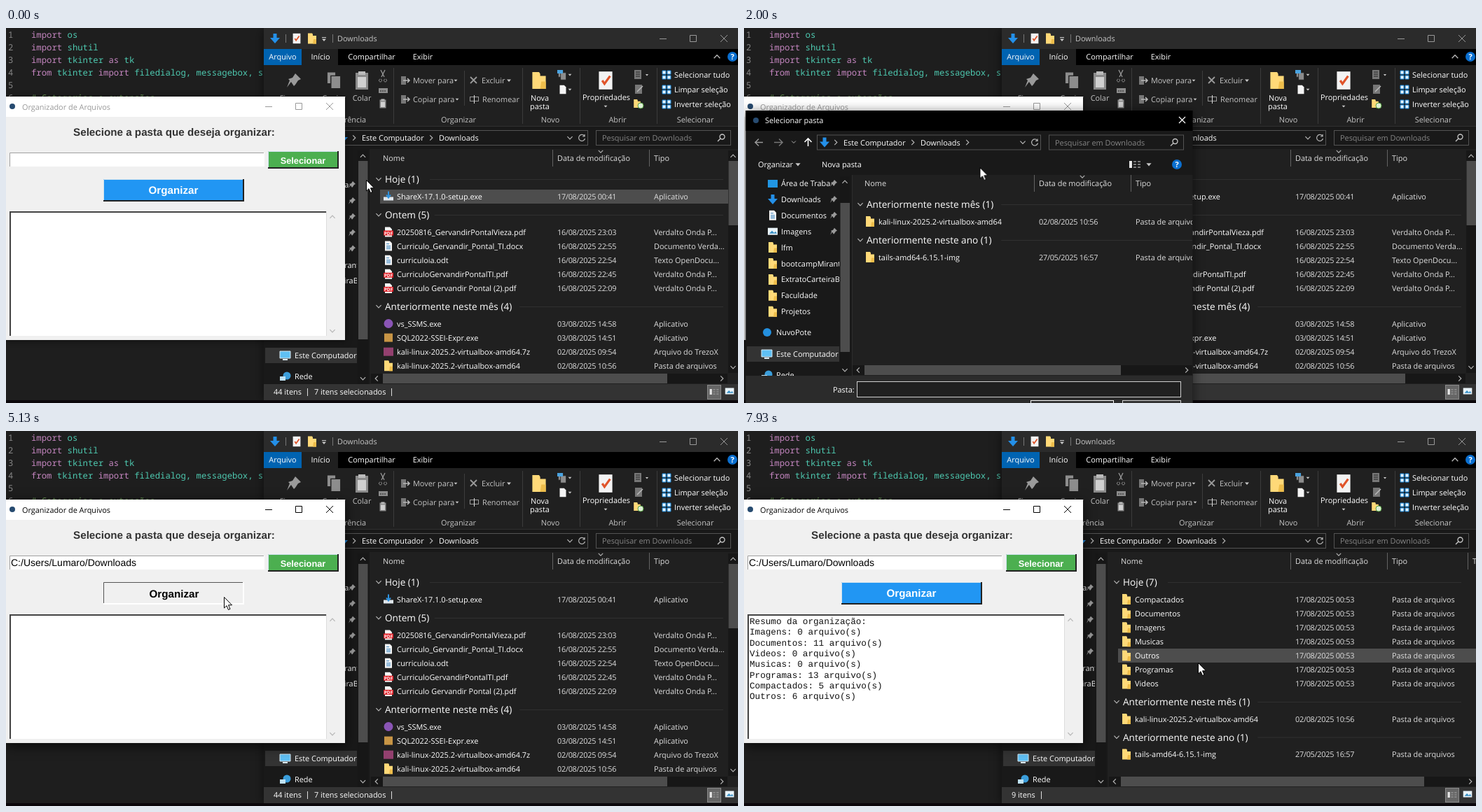
These frames come from a looping animation (1045 by 536 pixels, 8 s). An HTML page:

```html
<!DOCTYPE html>
<html lang="pt-BR">
<head>
<meta charset="utf-8">
<title>Organizador de Arquivos</title>
<style>
html, body { margin: 0; width: 100%; height: 100%; overflow: hidden; background: #1e1e1e; }
svg { display: block; }
text { font: 10.9px "Open Sans", "Noto Sans", sans-serif; fill: #fff; text-rendering: geometricPrecision; }
.mid { text-anchor: middle; }
.soft { fill: #c4c4c4; }
.cell { fill: #dedede; }
.date { fill: #dedede; letter-spacing: -.27px; }
.group { font-size: 13.6px; }
.code { font: 12.28px "Noto Sans Mono", "DejaVu Sans Mono", monospace; fill: #4ec9b0; white-space: pre; }
.kw { fill: #c586c0; }
.note { fill: #6a9955; }
.dim { fill: #858585; }
.msg { fill: #000; font-size: 10.5px; }
.bold { font: bold 15.2px "Liberation Sans", Arial, sans-serif; fill: #333; text-anchor: middle; }
.black { fill: #000; }
.btn { fill: #fff; }
.small { font-size: 12.8px; }
.path { font: 14px "Liberation Sans", Arial, sans-serif; fill: #000; }
.mono { font: 12.65px "Liberation Mono", "Courier New", monospace; fill: #111; white-space: pre; }

.shade { filter: drop-shadow(0 2px 8px rgba(0,0,0,.55)); }
.focus { animation: focus 8s step-end infinite; }
.focus text { fill: currentColor; }
.focus path { stroke: currentColor; }
.open { animation: glow 8s step-end infinite; }
.pick { animation: pick 8s step-end infinite; }
.press { animation: press 8s step-end infinite; }
.loading { animation: until-nav 8s step-end infinite; }
.navReady { animation: from-nav 8s step-end infinite; }
.working { animation: until-list 8s step-end infinite; }
.listReady { animation: from-list 8s step-end infinite; }
.typed { animation: from-path 8s step-end infinite; }
.summary { animation: from-summary 8s step-end infinite; }
.crumb { animation: from-crumb 8s step-end infinite; }
.before { animation: until-sorted 8s step-end infinite; }
.after { animation: from-sorted 8s step-end infinite; }
.count0 { animation: until-count 8s step-end infinite; }
.count1 { animation: from-count 8s step-end infinite; }
.okHover { animation: from-ok 8s step-end infinite; }
.hoverOut { animation: hover-out 8s linear infinite; }
.hoverIn { animation: hover-in 8s linear infinite; }
#dialog { transform-origin: 322px 342px; animation: dialog 8s linear infinite; }
#message { transform-origin: 422px 286px; animation: message 8s linear infinite; }
#cursor { animation: cursor 8s ease-in-out infinite; }

@keyframes focus {
  0%, 17.5%, 66.6% { color: #999; }
  7.5%, 41.6%, 86.6% { color: #000; }
}
@keyframes glow {
  0%, 17.5%, 66.6% { filter: drop-shadow(0 1px 5px rgba(0,0,0,.5)); }
  7.5%, 41.6%, 86.6% { filter: drop-shadow(0 4px 9px rgba(0,0,0,.65)); }
}
@keyframes pick { 0%, 9.2% { opacity: 0; } 7.5% { opacity: 1; } }
@keyframes press { 0%, 66.6% { opacity: 0; } 64.1% { opacity: 1; } }
@keyframes until-nav { 0% { opacity: 1; } 20.8% { opacity: 0; } }
@keyframes from-nav { 0% { opacity: 0; } 20.8% { opacity: 1; } }
@keyframes until-list { 0% { opacity: 1; } 24.1% { opacity: 0; } }
@keyframes from-list { 0% { opacity: 0; } 24.1% { opacity: 1; } }
@keyframes from-path { 0% { opacity: 0; } 50.85% { opacity: 1; } }
@keyframes from-summary { 0% { opacity: 0; } 66.6% { opacity: 1; } }
@keyframes from-crumb { 0% { opacity: 0; } 74.1% { opacity: 1; } }
@keyframes until-sorted { 0% { opacity: 1; } 87.5% { opacity: 0; } }
@keyframes from-sorted { 0% { opacity: 0; } 87.5% { opacity: 1; } }
@keyframes until-count { 0% { opacity: 1; } 93.3% { opacity: 0; } }
@keyframes from-count { 0% { opacity: 0; } 93.3% { opacity: 1; } }
@keyframes from-ok { 0% { opacity: 0; } 81.5% { opacity: 1; } }
@keyframes hover-out { 0%, .85% { opacity: 1; } 3.4%, 100% { opacity: 0; } }
@keyframes hover-in { 0%, 94.8% { opacity: 0; } 96.5%, 100% { opacity: 1; } }
@keyframes dialog {
  0%, 17.4% { opacity: 0; transform: scale(.92); }
  19.13% { opacity: .74; transform: scale(.985); }
  20.9%, 41.2% { opacity: 1; transform: none; }
  44% { opacity: .5; transform: scale(.965); }
  46.6% { opacity: .1; transform: scale(.93); }
  48.4% { opacity: .008; transform: scale(.92); }
  49.1%, 100% { opacity: 0; transform: scale(.92); }
}
@keyframes message {
  0%, 66.6% { opacity: 0; transform: scale(.9); }
  70%, 85.6% { opacity: 1; transform: none; }
  88.8%, 100% { opacity: 0; transform: scale(.9); }
}
@keyframes cursor {
  0%, .85% { transform: translate(514px, 217px); }
  3.4%, 13.3% { transform: translate(459px, 182px); }
  18.7%, 24.1% { transform: translate(334px, 194px); }
  34.1% { transform: translate(480px, 505px); }
  35.9%, 50.3% { transform: translate(489px, 540px); }
  60.9%, 73.3% { transform: translate(311px, 237px); }
  83.4%, 92.4% { transform: translate(489px, 333px); }
  98.5%, 100% { transform: translate(648px, 331px); }
}
</style>
</head>
<body>
<svg id="stage" width="1045" height="536" viewBox="0 0 1045 536">
<defs>
  <clipPath id="navClip"><path d="M3 210H136V497H3Z"/></clipPath>
  <clipPath id="sideClip"><path d="M368 173H501V508H368Z"/></clipPath>
  <clipPath id="paneClip"><path d="M154 205H640V480H154Z"/></clipPath>
  <path id="chev" d="M-1.8-3.6L1.8 0L-1.8 3.6" fill="none" stroke="#b5b5b5" stroke-width="1.2"/>
  <path id="drop" d="M-3-1.5H3L0 2Z" fill="#c8c8c8"/>
  <g id="folder"><path d="M-6-7.500H0L1-6V-4H6V7.500H-6Z" fill="#ffd978"/><path d="M2 1H6V7.500H1Z" fill="#eebd4b"/></g>
  <path id="page" d="M-5-7H2L5-4V7H-5Z" fill="#f4f4f4"/>
  <g id="pdf"><use href="#page"/><path d="M-7-2H7V5H-7Z" fill="#e01f26"/><text y="4" class="mid" style="font-size:6.5px;font-weight:bold">PDF</text></g>
  <g id="doc"><use href="#page"/><path d="M-3-3H1M-3 0H3M-3 2H3M-3 4H3" stroke="#3c86c2" fill="none"/></g>
  <g id="setup"><path d="M-7 1H7V6H-7Z" fill="#dfe6ec"/><path d="M0-7V1M-3-2L0 2L3-2" stroke="#2f93e0" stroke-width="2" fill="none"/></g>
  <circle id="violet" r="6.5" fill="#8a55b5"/>
  <path id="tan" d="M-6-6H6V6H-6Z" fill="#c89545"/>
  <path id="wine" d="M-7-6H7V6H-7Z" fill="#93406f"/>
  <circle id="leaf" r="4" fill="#274b70"/>
  <circle id="cloud" r="6" fill="#2490df"/>
  <path id="down" d="M-2.5-7H2.5V-1H7L0 7L-7-1H-2.5Z" fill="#2490e8"/>
  <path id="star" d="M0-6L2-2H6L3 1L4 6L0 3L-4 6L-3 1L-6-2H-2Z" fill="#2e9df0"/>
  <g id="pc"><path d="M-8-6H7V4H-8Z" fill="#5fc0f4" stroke="#d9e9f2"/><path d="M-4 6H3" stroke="#d9e9f2" stroke-width="2"/></g>
  <g id="net"><circle cx="2" cy="-1" r="5.5" fill="#3b9edb"/><path d="M-8 0H0V6H-8Z" fill="#bfe2f5"/></g>
  <path id="desk" d="M-7-5H7V6H-7Z" fill="#2196e3"/>
  <g id="image"><path d="M-7-5H7V5H-7Z" fill="#eaf4fa"/><path d="M-5 3L-1-1L2 2L4 0L6 3Z" fill="#388fc4"/></g>
  <path id="pin" d="M1-5L5-1L3 0L1 3L0 4L-2 1L-5 5L-3 0L-4-1L-1-2Z" fill="#9a9a9a"/>
  <g id="lens" fill="none" stroke="#c8c8c8" stroke-width="1.3"><circle cx="1.5" cy="-1.5" r="3.5"/><path d="M-1 1L-5 5"/></g>
  <path id="reload" d="M3.5-3A4.5 4.5 0 1 0 4.5 1M4-5V-2H1" fill="none" stroke="#b5b5b5" stroke-width="1.2"/>
  <g id="help"><circle r="7" fill="#0a6fd0"/><text y="4" class="mid" style="font-weight:bold">?</text></g>
  <g id="check"><path d="M-6-8H6V8H-6Z" fill="#f3f3f3"/><path d="M-3 0L-1 3L4-4" stroke="#e0542a" stroke-width="2" fill="none"/></g>
  <g id="sheets" fill="#8d8d8d" stroke="#202020"><path d="M-7-8H2V4H-7Z"/><path d="M-3-4H7V9H-3Z"/></g>
  <g id="tiles" fill="#e5f2fb" stroke="#1686d9"><path d="M-6-6H-1V-1H-6ZM1-6H6V-1H1ZM-6 1H-1V6H-6ZM1 1H6V6H1Z"/></g>
  <g id="lines"><path d="M-8-5H-4V5H-8Z" fill="#e8e8e8"/><path d="M-2-4H2M4-4H8M-2 0H2M4 0H8M-2 4H2M4 4H8" stroke="#999" stroke-width="1.5"/></g>
</defs>
</svg>
<script>
const T = (x, y, s, c = '') => `<text x="${x}" y="${y + 4}" class="${c}">${s}</text>`;
const R = (x, y, w, h, fill, more = '') => `<rect x="${x}" y="${y}" width="${w}" height="${h}" fill="${fill}" ${more}/>`;
const P = (d, stroke, w = 1, more = '') => `<path d="${d}" fill="none" stroke="${stroke}" stroke-width="${w}" ${more}/>`;
const I = (id, x, y, turn = 0, size = 1) =>
  `<use href="#${id}" transform="translate(${x} ${y}) rotate(${turn}) scale(${size})"/>`;
const G = (c, ...parts) => `<g class="${c}">${parts.join('')}</g>`;
const clip = (id, ...parts) => `<g clip-path="url(#${id})">${parts.join('')}</g>`;
const each = (list, f) => list.map(f).join('');
const frame = (x, y, w, h, stroke, fill = 'none') => R(x + .5, y + .5, w - 1, h - 1, fill, `stroke="${stroke}"`);

function editor() {
  const kw = s => `<tspan class="kw">${s}</tspan>`;
  const code = [kw('import') + ' os', kw('import') + ' shutil', `${kw('import')} tkinter ${kw('as')} tk`,
    `${kw('from')} tkinter ${kw('import')} filedialog, messagebox, scrolledtext`, '',
    '<tspan class="note"># Categorias e extensões</tspan>'];
  return R(0, 0, 1045, 536, '#1e1e1e') + each(code, (s, i) =>
    T(3, 10 + 18 * i, i + 1, 'code dim') + T(36, 10 + 18 * i, s, 'code'));
}

const winButtons = (x, y) => P(`M${x - 5} ${y + .5}h10M${x + 38.5} ${y - 4.5}h9v9h-9z`
  + `M${x + 82} ${y - 5}l10 10m0-10l-10 10`, '#999');

function address(ox, y, end, crumb) {
  return frame(ox + 104 - 366, y - 11, end - ox + 262, 22, '#535353', '#191919')
    + I('down', ox - 251, y) + I('chev', ox - 235, y) + T(ox - 224, y, 'Este Computador')
    + I('chev', ox - 125, y) + T(ox - 114, y, 'Downloads') + G(crumb, I('chev', ox - 47, y))
    + I('chev', end - 26, y, 90) + I('reload', end - 9, y);
}
const search = (x, y) => frame(x, y - 11, 193, 22, '#535353', '#191919')
  + T(x + 9, y, 'Pesquisar em Downloads', 'dim') + I('lens', x + 179, y);

const header = (ox, y) => T(ox, y, 'Nome', 'cell') + T(ox + 249, y, 'Data de modificação', 'cell')
  + T(ox + 387, y, 'Tipo', 'cell') + I('chev', ox + 311, y - 9.5, 90, .9)
  + P(`M${ox + 242.5} ${y - 12}v24m138-24v24`, '#636363');

function list(ox, groups) {
  return each(groups, ([y, title, rows]) => I('chev', ox - 6, y, 90) + T(ox + 3, y + 1, title, 'group')
    + P(`M${ox + 13 + title.length * 6.75} ${y + .5}H${ox + 486}`, '#303030')
    + each(rows, ([icon, name, date, type], i) => {
      const ry = y + 24.5 + 20.1 * i;
      return I(icon, ox + 8, ry) + T(ox + 20, ry, name) + T(ox + 249, ry, date, 'date') + T(ox + 387, ry, type, 'cell');
    }));
}
const dir = (name, date) => ['folder', name, date, 'Pasta de arquivos'];
const kali = dir('kali-linux-2025.2-virtualbox-amd64', '02/08/2025 10:56');
const tails = dir('tails-amd64-6.15.1-img', '27/05/2025 16:57');

function sidebar(ox, dy) {
  const items = [['desk', 'Área de Traba'], ['down', 'Downloads'], ['doc', 'Documentos'], ['image', 'Imagens'],
    ['folder', 'lfm'], ['folder', 'bootcampMirantes'], ['folder', 'ExtratoCarteiraBase'], ['folder', 'Faculdade'], ['folder', 'Projetos']];
  const pinned = ox ? 5 : 4;
  return each(items, ([icon, name], i) => {
    const y = 222 + dy + 22.9 * i;
    return I(icon, ox + 41, y) + T(ox + 53, y, name) + (i < pinned ? I('pin', ox + 128, y) : '');
  }) + roots(ox, [['cloud', 'NuvoPote', 435], ['pc', 'Este Computador', 466], ['net', 'Rede', 496]], dy);
}
const roots = (ox, items, dy = 0) => each(items, ([icon, name, y]) =>
  (icon === 'pc' ? R(ox + 4, y + dy - 11, 148, 22, '#333') : '') + I(icon, ox + 33, y + dy) + T(ox + 46, y + dy, name));

const vBar = (x, y1, y2, a, b) => R(x - 7, y1 - 8, 14, y2 - y1 + 16, '#171717') + R(x - 6.5, a, 13.5, b - a, '#4d4d4d')
  + I('chev', x, y1, -90) + I('chev', x, y2, 90);
const hBar = (y, x1, x2, a, b) => R(x1 - 8, y - 7, x2 - x1 + 16, 14, '#171717') + R(a, y - 7, b - a, 14, '#4d4d4d')
  + I('chev', x1, y, 180) + I('chev', x2, y);

function ribbon() {
  const label = (x, s) => T(x, 131, s, 'mid soft');
  const clipboard = (x, y, s) => `<g transform="translate(${x} ${y}) scale(${s})">${R(-9, -11, 18, 24, '#8b8b8b')}${R(-5, -13, 10, 5, '#bbb')}${R(-6, -5, 12, 15, '#d0d0d0')}</g>`;
  return R(368, 53, 677, 87, '#202020') + P('M368 140.5H1045', '#303030')
    + P('M553.5 57v80M654.5 61v50M737.5 57v80M819.5 57v80M929.5 57v80', '#3c3c3c')
    + I('pin', 411, 75, 0, 2) + T(411, 100, 'Fixar no', 'mid soft')
    + I('sheets', 468, 74, 0, 1.4) + T(468, 100, 'Copiar', 'mid soft') + clipboard(508, 75, 1) + T(508, 100, 'Colar', 'mid soft')
    + P('M535 60l5 10m1-10l-5 10', '#999', 1.3) + P('M534 73a2 2 0 1 0 1 0m6 0a2 2 0 1 0 1 0', '#999')
    + R(532, 86, 13, 7, '#8b8b8b') + P('M534 90h9', '#202020', 1, 'stroke-dasharray="2 1"') + clipboard(538, 108, .5)
    + `<text x="514" y="135" class="soft" text-anchor="end">Área de Transferência</text>`
    + each([[75, 'Mover para', 642], [102, 'Copiar para', 644]], ([y, s, end]) =>
      R(564, y - 6, 7, 12, '#777') + P(`M567 ${y}h9m-3-3l3 3l-3 3`, '#bbb', 1.5) + T(581, y, s, 'soft') + I('drop', end, y, 0, .8))
    + P('M663 70l9 9m0-9l-9 9', '#999', 1.8) + T(679, 75, 'Excluir', 'soft') + I('drop', 718, 75)
    + frame(662, 98, 13, 7, '#999') + P('M668.5 96v12', '#ddd') + T(680, 102, 'Renomear', 'soft') + label(646, 'Organizar')
    + I('folder', 761, 75, 0, 1.6) + T(762, 100, 'Nova', 'mid') + T(762, 112, 'pasta', 'mid') + label(777, 'Novo')
    + I('sheets', 794, 67, 0, .8) + R(787, 60, 8, 5, '#4aa3e0') + I('drop', 805, 67, 0, .8) + I('page', 795, 88, 0, .9) + I('drop', 805, 88, 0, .8)
    + I('check', 856, 75, 0, 1.6) + T(857, 99, 'Propriedades', 'mid') + I('drop', 856, 112, 0, .8)
    + R(897, 60, 10, 13, '#777') + P('M899 63h6m-6 3h6m-6 3h6', '#222') + I('drop', 915, 67, 0, .7) + R(898, 81, 10, 13, '#777') + P('M901 91l8-8', '#bbb', 1.5)
    + I('folder', 901, 108, 0, .8) + `<circle cx="906" cy="111" r="4" fill="#dff0d8" stroke="#57a443"/>` + label(873, 'Abrir')
    + each(['Selecionar tudo', 'Limpar seleção', 'Inverter seleção'], (s, i) => I('tiles', 943, 67 + 21 * i) + T(954, 67 + 21 * i, s))
    + label(984, 'Selecionar');
}

function explorer() {
  const today = s => dir(s, '17/08/2025 00:53');
  const pdf = (name, time) => ['pdf', name, `16/08/2025 ${time}`, 'Verdalto Onda P...'];
  const unsorted = [
    [216, 'Hoje (1)', [['setup', 'ShareX-17.1.0-setup.exe', '17/08/2025 00:41', 'Aplicativo']]],
    [267, 'Ontem (5)', [pdf('20250816_GervandirPontalVieza.pdf', '23:03'),
      ['doc', 'Curriculo_Gervandir_Pontal_TI.docx', '16/08/2025 22:55', 'Documento Verda...'],
      ['doc', 'curriculoia.odt', '16/08/2025 22:54', 'Texto OpenDocu...'],
      pdf('CurriculoGervandirPontalTI.pdf', '22:45'), pdf('Curriculo Gervandir Pontal (2).pdf', '22:09')]],
    [398, 'Anteriormente neste mês (4)', [['violet', 'vs_SSMS.exe', '03/08/2025 14:58', 'Aplicativo'],
      ['tan', 'SQL2022-SSEI-Expr.exe', '03/08/2025 14:51', 'Aplicativo'],
      ['wine', 'kali-linux-2025.2-virtualbox-amd64.7z', '02/08/2025 09:54', 'Arquivo do TrezoX'], kali]]];
  const sorted = [
    [216, 'Hoje (7)', ['Compactados', 'Documentos', 'Imagens', 'Musicas', 'Outros', 'Programas', 'Videos'].map(today)],
    [387, 'Anteriormente neste mês (1)', [kali]], [437.5, 'Anteriormente neste ano (1)', [tails]]];
  return R(368, 0, 677, 532, '#191919', 'class="shade"') + R(368, 0, 677, 30, '#2b2b2b') + R(368, 30, 677, 23, '#000')
    + I('down', 384, 15) + P('M399.5 9v12M466.5 9v12', '#777') + I('check', 415, 15, 0, .9) + I('folder', 437, 15)
    + P('M451 13.5h6', '#ccc') + I('drop', 454, 17) + T(473, 15, 'Downloads', 'soft') + winButtons(938, 15)
    + R(368, 30, 54, 23, '#0063b1') + R(422, 30, 52, 23, '#202020')
    + each([[395, 'Arquivo'], [449, 'Início'], [522, 'Compartilhar'], [595, 'Exibir']], ([x, s]) => T(x, 41, s, 'mid'))
    + I('chev', 1015, 41, -90, 1.2) + I('help', 1037, 41) + ribbon()
    + address(732, 157, 831, 'crumb') + search(842, 157)
    + R(519, 173, 526, 336, '#202020') + clip('sideClip', sidebar(366, 2)) + vBar(509.5, 183, 501, 190, 445)
    + header(538, 186)
    + G('before', R(534, 231, 497, 20, '#4d4d4d', 'class="hoverOut"'), list(538, unsorted),
      vBar(1038, 183, 485, 190, 282), hBar(501, 529, 1022, 538, 944))
    + G('after', R(534, 311, 511, 20, '#4d4d4d', 'class="hoverIn"'), list(538, sorted), P('M1033.5 174v24', '#636363'),
      T(1040, 186, 'T', 'cell'), hBar(501, 529, 1037, 538, 971))
    + R(368, 509, 677, 23, '#333')
    + G('count0', T(382, 520, '44 itens'), T(440, 520, '7 itens selecionados'), P('M430.5 515v11M550.5 515v11', '#ddd'))
    + G('count1', T(382, 520, '9 itens'), P('M424.5 515v11', '#ddd'))
    + frame(1001, 510, 20, 21, '#8a8a8a', '#666') + I('lines', 1011, 520, 0, .8) + I('image', 1033, 519, 0, .9)
    + R(0, 532, 1045, 4, '#0b070b');
}

function button(x, y, w, h, fill, s, size, state) {
  const cx = x + w / 2, cy = y + h / 2 + 1;
  const edge = (a, b) => P(`M${x + .5} ${y + h}V${y + .5}H${x + w}`, a) + P(`M${x} ${y + h - 1}H${x + w - 1}V${y}`, b, 2);
  return R(x, y, w, h, fill) + edge('#cfe3ef', '#222') + T(cx - .5, cy, s, 'bold btn ' + size)
    + G(state, R(x, y, w, h, '#f0f0f0'), edge('#555', '#fff'), T(cx + .5, cy + 1, s, 'bold black ' + size));
}

function organizer() {
  const totals = ['Resumo da organização:', ...[['Imagens', 0], ['Documentos', 11], ['Videos', 0], ['Musicas', 0],
    ['Programas', 13], ['Compactados', 5], ['Outros', 6]].map(([s, n]) => `${s}: ${n} arquivo(s)`)];
  return R(0, 98, 484, 348, '#f0f0f0', 'class="open"') + R(0, 98, 484, 29, '#fff') + I('leaf', 9, 112)
    + G('focus', T(23, 112.5, 'Organizador de Arquivos'), winButtons(375, 112))
    + T(240, 149.5, 'Selecione a pasta que deseja organizar:', 'bold')
    + R(5, 178, 364, 20, '#fff') + P('M5.5 198V178.5H368', '#a0a0a0')
    + G('typed', T(7, 189, 'C:/Users/Lumaro/Downloads', 'path'))
    + button(374, 176, 101, 25, '#4caf50', 'Selecionar', 'small', 'pick')
    + button(139, 216, 201, 32, '#2196f3', 'Organizar', '', 'press')
    + R(5, 262, 452, 178, '#fff') + P('M6 440V263H457', '#444', 2) + P('M457.5 262V440', '#ddd')
    + I('chev', 466, 270, -90) + I('chev', 466, 433, 90)
    + G('summary', each(totals, (s, i) => T(8, 272 + 15.35 * i, s, 'mono')));
}

function dialog() {
  const loadingNav = roots(0, [['star', 'Acesso rápido', 236.5], ['cloud', 'NuvoPote', 267], ['pc', 'Este Computador', 297.5], ['net', 'Rede', 328]]);
  return R(2.5, 118, 638, 448, '#191919', 'class="shade"') + R(2.5, 118, 638, 29, '#000')
    + I('leaf', 17, 132) + T(30, 132, 'Selecionar pasta') + P('M621 127l9 9m0-9l-9 9', '#fff', 1.2)
    + P('M27 163.5H16m5-5l-5 5l5 5', '#999', 1.5) + P('M43 163.5h12m-5-5l5 5l-5 5', '#777', 1.5)
    + I('chev', 71, 163, 90, .8) + P('M91.5 169V158m-5 5l5-5l5 5', '#fff', 1.6)
    + address(366, 163.5, 424, 'listReady') + search(435, 163.5)
    + G('navReady', T(20, 195, 'Organizar'), I('drop', 77, 195, 0, 1.2), T(111, 195, 'Nova pasta'), I('lines', 558, 195), I('drop', 578, 195, 0, 1.2))
    + I('help', 618, 195) + R(154, 210, 486.5, 288, '#202020') + P('M154.5 210V498', '#2d2d2d')
    + G('loading', loadingNav)
    + G('navReady', R(3, 210, 151, 287, '#191919'), clip('navClip', sidebar(0, 0)), vBar(144, 220, 489, 250, 463))
    + clip('paneClip', header(172, 222),
      G('working', T(398, 256, 'Trabalhando nisso...', 'mid')),
      G('listReady', list(172, [[252, 'Anteriormente neste mês (1)', [kali]], [303, 'Anteriormente neste ano (1)', [tails]]])))
    + hBar(489, 163, 632, 172, 538) + R(2.5, 497, 638, 69, '#2b2b2b')
    + T(127, 516.5, 'Pasta:') + frame(161, 505, 463, 23, '#d0d0d0', '#202020') + G('working', P('M168.5 509v14', '#fff'))
    + frame(409, 532, 119, 24, '#fff', '#333') + frame(540, 532, 84, 24, '#d0d0d0', '#333');
}

function message() {
  const ok = (stroke, fill) => frame(469, 328, 70, 21, stroke, fill);
  return R(290.5, 213.5, 263, 145, '#fff', 'stroke="#777" class="shade"') + R(291, 318, 262, 40, '#f0f0f0')
    + I('leaf', 306, 228) + T(319, 229, 'Sucesso', 'black') + P('M535 224l9 9m0-9l-9 9', '#222')
    + '<circle cx="326.5" cy="281" r="14" fill="#0b78d4"/>' + R(325.5, 277, 2, 11, '#fff') + R(325.5, 273, 2, 2.2, '#fff')
    + T(351, 282, 'Arquivos organizados com sucesso!', 'msg')
    + ok('#0078d7', '#e1e1e1') + G('okHover', ok('#0078d7', '#e5f1fb')) + T(504, 339, 'OK', 'black mid');
}

const arrow = '<path d="M.5.5V16L4 12.7L6.5 18.5L9 17.4L6.5 11.8H11.5Z" fill="#fff" stroke="#000"/>';
document.getElementById('stage').insertAdjacentHTML('beforeend', editor() + explorer() + organizer()
  + `<g id="dialog">${dialog()}</g><g id="message">${message()}</g><g id="cursor">${arrow}</g>`);
</script>
</body>
</html>
```
